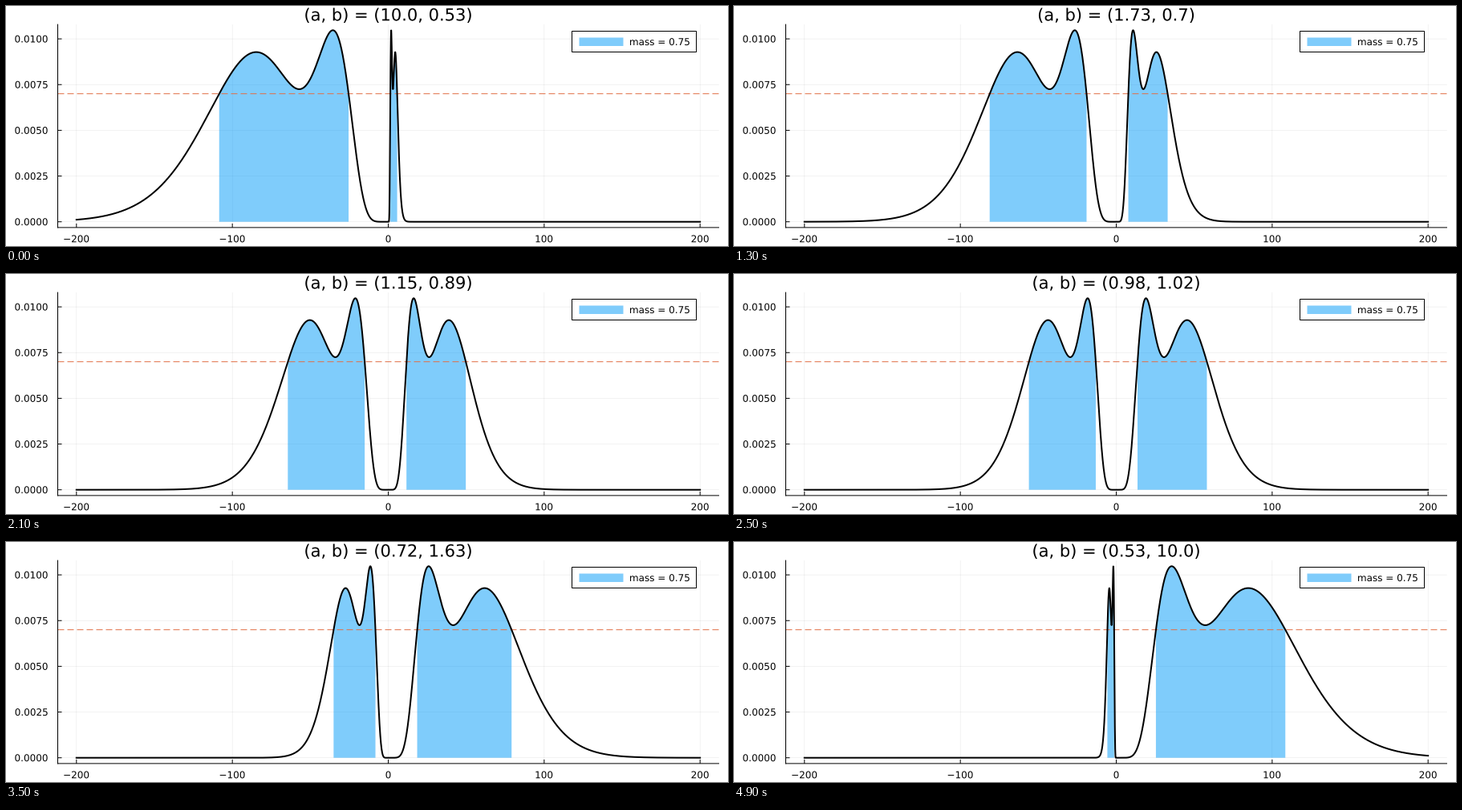
These frames come from a looping animation (900 by 300 pixels, 5000 ms). A matplotlib script:

```python
import math

import matplotlib.pyplot as plt
import numpy as np
from matplotlib.animation import FuncAnimation
from matplotlib.patches import PathPatch, Rectangle
from matplotlib.textpath import TextPath
from matplotlib.transforms import Affine2D, IdentityTransform

plt.rcParams["font.family"] = "DejaVu Sans"
plt.rcParams["path.snap"] = False  # keep lines at sub-pixel positions

W, H, DPI = 900, 300, 100
PX = 72 / DPI  # points per pixel
FRAMES, INTERVAL = 50, 100
LEVEL = 0.007
BLUE, ORANGE = "#009af9", "#e26f46"
LEFT, CENTER, RIGHT = 0, 0.5, 1


def gamma_pdf(y, shape, scale):
    return y ** (shape - 1) * np.exp(-y / scale) / (math.gamma(shape) * scale**shape)


def half_density(y):
    """Two-gamma mixture on y >= 0 with total mass one half."""
    return 0.15 * gamma_pdf(y, 10, 2) + 0.35 * gamma_pdf(y, 10, 5)


def density(x, a, b):
    return half_density(np.where(x >= 0, a * x, -b * x))


def text_outline(x, baseline, text, size=12, align=LEFT):
    path = TextPath((0, 0), text, size=size)
    box = path.get_extents()
    shift = x - box.x0 - align * box.width
    return path.transformed(Affine2D().translate(shift, H - baseline))


def put_text(*args, **kwargs):
    return fig.add_artist(PathPatch(text_outline(*args, **kwargs), linewidth=0,
                                    facecolor="black", transform=IdentityTransform()))


def put_rect(x0, y0, x1, y1, **style):
    fig.add_artist(Rectangle((x0, H - y1), x1 - x0, y1 - y0,
                             transform=IdentityTransform(), **style))


def region(scale):
    """Outline of the area under the curve where it exceeds LEVEL."""
    x = core / scale
    return np.column_stack([np.r_[x[0], x, x[-1]], np.r_[0, core_height, 0]])


xs = np.linspace(-200, 200, 4001)
ys = np.linspace(10, 62, 5201)
core = ys[half_density(ys) >= LEVEL]
core_height = half_density(core)
peak = half_density(ys).max()

fig = plt.figure(figsize=(W / DPI, H / DPI), dpi=DPI, facecolor="white")
left, right, top, bottom = 64.5, 888.5, 23.1, 276.9
x_min, x_max, y_min, y_max = -212, 212, -0.03 * peak, 1.03 * peak
x_unit = (right - left) / (x_max - x_min)
y_unit = (bottom - top) / (y_max - y_min)

ax = fig.add_axes([left / W, 1 - bottom / H, (right - left) / W, (bottom - top) / H])
ax.set_xlim(x_min, x_max)
ax.set_ylim(y_min, y_max)
ax.spines[["top", "right"]].set_visible(False)
ax.spines[["left", "bottom"]].set_linewidth(PX)

x_ticks = np.arange(-200, 201, 100)
y_ticks = np.arange(5) * 0.0025
ax.set_xticks(x_ticks)
ax.set_yticks(y_ticks)
ax.tick_params(length=0, labelleft=False, labelbottom=False)
ax.set_axisbelow(True)
ax.grid(color="black", alpha=0.1, linewidth=0.5 * PX)
ax.vlines(x_ticks, y_min, y_min + 5 / y_unit, color="black", linewidth=PX)
ax.hlines(y_ticks, x_min, x_min + 5 / x_unit, color="black", linewidth=PX)

for tick in x_ticks:
    put_text(left + (tick - x_min) * x_unit, 295.3,
             str(tick).replace("-", "\u2212"), align=CENTER)
for tick in y_ticks:
    put_text(51.7, bottom - (tick - y_min) * y_unit + 4.4, f"{tick:.4f}", align=RIGHT)

fills = [ax.fill([0], [0], color=BLUE, alpha=0.5, linewidth=0, zorder=2)[0]
         for _ in range(2)]
ax.axhline(LEVEL, color=ORANGE, linewidth=PX, zorder=2.5,
           dashes=(8, 4), dash_capstyle="butt")
curve, = ax.plot([], [], color="black", linewidth=2 * PX, zorder=3)

put_rect(705.5, 31.5, 860.5, 57.5, facecolor="white", edgecolor="black", linewidth=PX)
put_rect(714.5, 39.5, 769.5, 50, facecolor=BLUE, alpha=0.5, linewidth=0)
put_text(778, 49, "mass = 0.75")
title = put_text(476.5, 18.3, "(a, b)", size=21, align=CENTER)


def update(frame):
    inverse_a = 0.1 + 1.8 * frame / (FRAMES - 1)
    a, b = 1 / inverse_a, 1 / (2 - inverse_a)
    curve.set_data(xs, density(xs, a, b))
    fills[0].set_xy(region(a))
    fills[1].set_xy(region(-b))
    label = f"(a, b) = ({round(a, 2)}, {round(b, 2)})"
    title.set_path(text_outline(476.5, 18.3, label, size=21, align=CENTER))
    return [curve, *fills, title]


anim = FuncAnimation(fig, update, frames=FRAMES, interval=INTERVAL,
                     repeat=True, repeat_delay=0)
plt.show()
```
